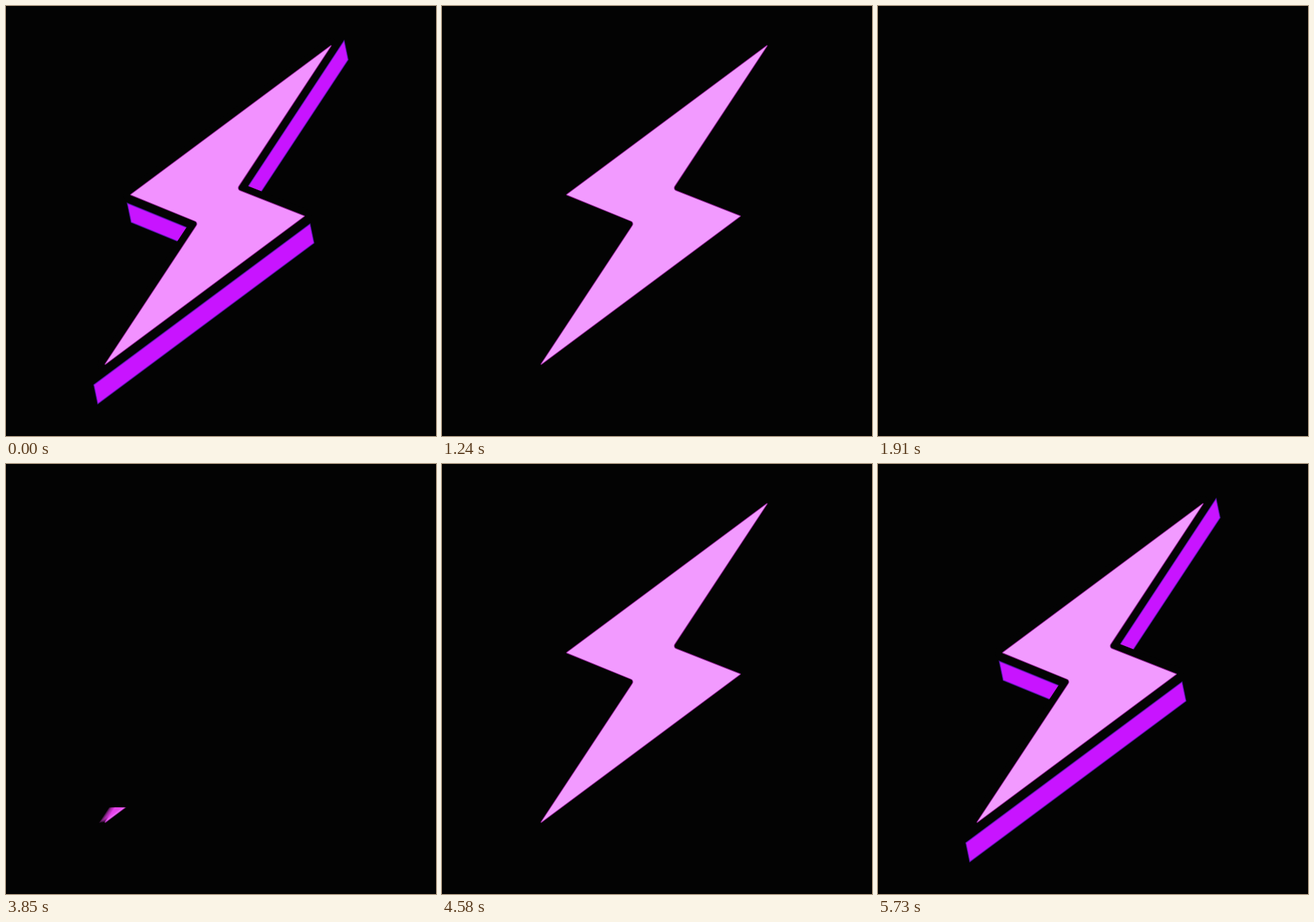
Animation of 600 by 600 pixels, one loop 5.76 s. Source, as an HTML page with a canvas:

```html
<!DOCTYPE html>
<html lang="en">
<head>
<meta charset="utf-8">
<title>Lightning bolt</title>
<style>
  html, body { margin: 0; height: 100%; overflow: hidden; background: #030303; }
  canvas { display: block; }
</style>
</head>
<body>
<canvas id="stage" width="600" height="600"></canvas>
<script>
const ctx = document.getElementById('stage').getContext('2d');
const LOOP = 5760;
const BLACK = '#030303';
const DEPTH = { x: 5.5, y: 26.5 };
const point = (x, y) => ({ x, y });

const tip = point(453.4, 55.5), tail = point(138.5, 499.7);
const right = point(416, 293.2), left = point(174.2, 263.2);
const upperNotch = point(321.3, 256), lowerNotch = point(269, 302);
const face = [tip, upperNotch, right, tail, lowerNotch, left];

const ramp = (t, from, to) => Math.min(1, Math.max(0, (t - from) / (to - from)));
const smooth = x => x * x * (3 - 2 * x);
const mix = (a, b, p) => a + (b - a) * p;

function facePath() {
  ctx.beginPath();
  face.forEach((p, i) => {
    const next = face[(i + 1) % face.length];
    const radius = i % 3 === 1 ? 4.5 : 0;
    ctx.arcTo(p.x, p.y, next.x, next.y, radius);
  });
  ctx.closePath();
}

function stroke(color, width) {
  ctx.strokeStyle = color;
  ctx.lineWidth = width;
  ctx.stroke();
}

function drawFace(color) {
  facePath();
  ctx.lineJoin = 'round';
  stroke('#8c1e92', 2);
  ctx.fillStyle = color;
  ctx.fill();
}

// Push an edge of the face downwards by a gap, lengthen its start and extrude it
function drawSide(from, to, gap, extend, amount) {
  const length = Math.hypot(to.x - from.x, to.y - from.y);
  const ux = (to.x - from.x) / length, uy = (to.y - from.y) / length;
  const side = Math.sign(ux) * gap;
  const a = point(from.x - uy * side - ux * extend, from.y + ux * side - uy * extend);
  const b = point(to.x - uy * side, to.y + ux * side);
  const dx = DEPTH.x * amount, dy = DEPTH.y * amount;
  ctx.beginPath();
  ctx.moveTo(a.x, a.y);
  ctx.lineTo(b.x, b.y);
  ctx.lineTo(b.x + dx, b.y + dy);
  ctx.lineTo(a.x + dx, a.y + dy);
  ctx.closePath();
  ctx.fillStyle = '#c814ff';
  ctx.fill();
  ctx.lineJoin = 'miter';
  stroke('rgba(90, 25, 190, 0.7)', 1.4);
}

function drawSides(amount) {
  drawSide(tip, upperNotch, 11.5, 16, amount);
  drawSide(left, lowerNotch, 13, 0, amount);
  drawSide(tail, right, 13.7, 30, amount);
  facePath();
  ctx.lineJoin = 'round';
  stroke(BLACK, 21);
}

// Dim smear trailing the lower tip while the face is nearly hidden
function drawSmear(dx, dy, strength) {
  const steps = 8;
  ctx.fillStyle = `rgba(225, 60, 230, ${0.25 * strength})`;
  for (let i = steps; i > 0; i--) {
    ctx.save();
    ctx.translate(dx * i / steps, dy * i / steps);
    facePath();
    ctx.fill();
    ctx.restore();
  }
}

function draw(t) {
  const leaving = t < LOOP / 2;
  const depth = leaving ? 1 - smooth(ramp(t, 700, 1235)) : smooth(ramp(t, 4860, 5420));
  const top = leaving
    ? mix(50, 500, ramp(t, 1305, 1891))
    : mix(500, 50, ramp(t, 3820, 4493));

  ctx.fillStyle = BLACK;
  ctx.fillRect(0, 0, 600, 600);
  if (top >= 500) return;

  if (depth > 0) drawSides(depth);
  ctx.save();
  ctx.beginPath();
  ctx.rect(0, top, 600, 600 - top);
  ctx.clip();
  const strength = ramp(top, 400, 480);
  const green = mix(mix(145, 154, ramp(t, 150, 700)), 115, strength);
  drawFace(`rgb(242, ${green}, 255)`);
  if (strength) drawSmear(leaving ? -14 : -9, leaving ? 11 : 1.5, strength);
  ctx.restore();
}

function tick() {
  draw(performance.now() % LOOP);
  requestAnimationFrame(tick);
}
tick();
</script>
</body>
</html>
```
